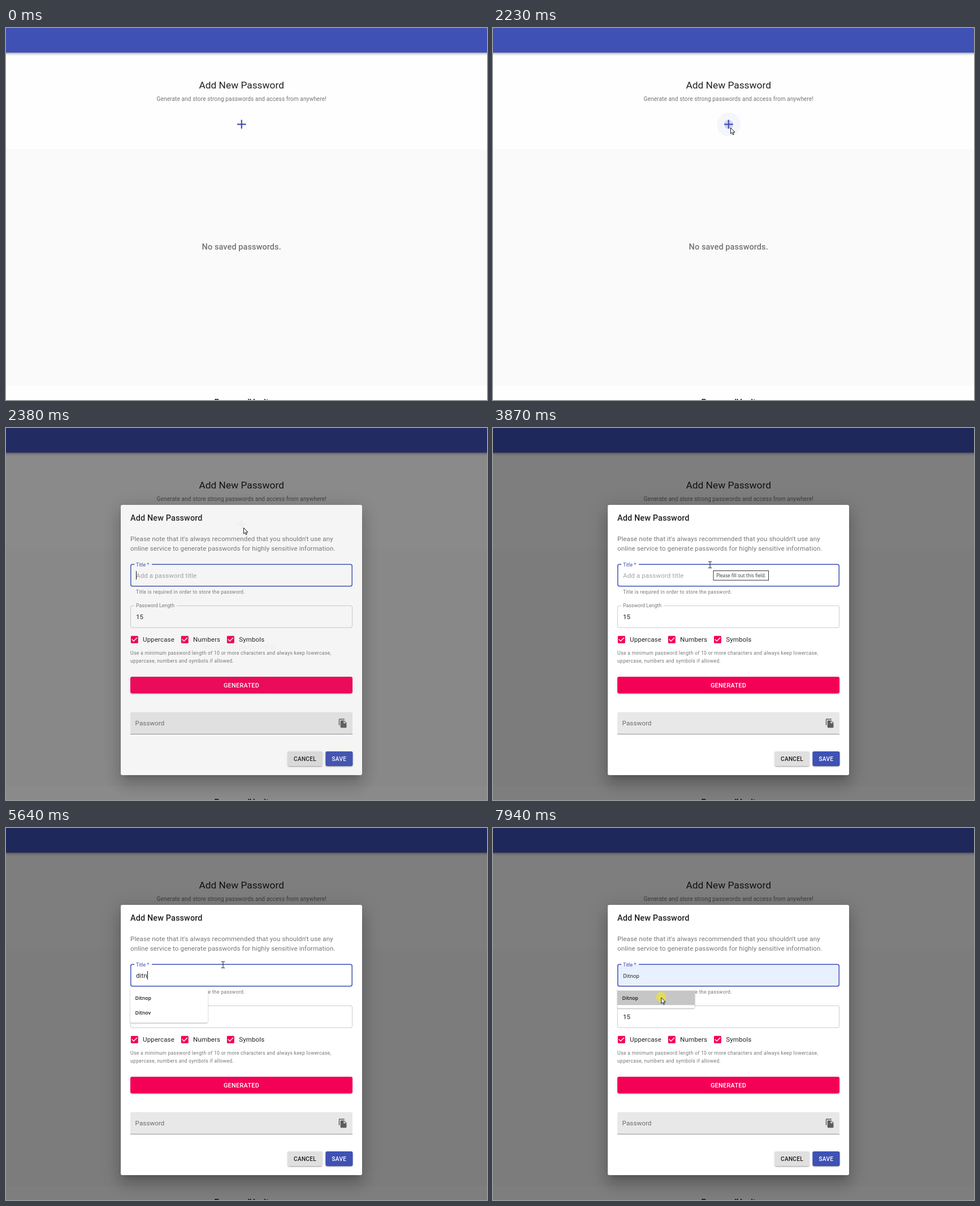
Recreate the animation shown at these times as an HTML page with a canvas. Size 851 by 658 pixels, loop 8000 ms.

```html
<!DOCTYPE html>
<html lang="en">
<head>
<meta charset="utf-8">
<title>Add New Password</title>
<style>
  html, body { margin: 0; width: 100%; height: 100%; overflow: hidden; background: #fff; }
  canvas { display: block; }
</style>
</head>
<body>
<canvas id="stage" width="851" height="658"></canvas>
<script>
const W = 851, H = 658, LOOP = 8000, K = 0.722, MID = 416.7;
const BLUE = '#3f51b5', PINK = '#f50057';
const ink = a => `rgba(0,0,0,${a})`;

// weight, size and letter spacing (em) before the page zoom K
const STYLES = {
  h5: [400, 24, 0], h6: [500, 20, 0.0075], body: [400, 16, 0.00938],
  body2: [400, 14, 0.01071], caption: [400, 12, 0.03333], label: [400, 12, 0.00938],
  button: [500, 14, 0.02857], large: [500, 15, 0.02857],
  item: [600, 12.1, 0, 'Open Sans'], preview: [400, 12.7, 0, 'Open Sans'], tip: [400, 11.35, 0, 'Open Sans']
};

function layer() {
  const c = document.createElement('canvas');
  c.width = W; c.height = H;
  return c.getContext('2d');
}

function setFont(c, style) {
  const [weight, size, spacing, family = 'Roboto'] = STYLES[style];
  c.font = `${weight} ${size * K}px "${family}", sans-serif`;
  c.letterSpacing = `${spacing * size * K}px`;
}

function text(c, str, x, y, style, color = ink(0.87), align = 'left') {
  setFont(c, style);
  c.fillStyle = color;
  c.textAlign = align;
  c.fillText(str, x, y);
}

function rect(c, x, y, w, h, color, r = 0) {
  c.fillStyle = color;
  c.beginPath();
  c.roundRect(x, y, w, h, r);
  c.fill();
}

function disc(c, x, y, r, color) {
  c.fillStyle = color;
  c.beginPath();
  c.arc(x, y, r, 0, Math.PI * 2);
  c.fill();
}

// each shadow: offset y, blur, spread, alpha
function shadow(c, x, y, w, h, list) {
  c.save();
  c.shadowOffsetX = 3000;
  for (const [dy, blur, spread, a] of list) {
    const s = spread * K;
    c.shadowColor = ink(a);
    c.shadowOffsetY = dy * K;
    c.shadowBlur = blur * K;
    rect(c, x - s - 3000, y - s, w + 2 * s, h + 2 * s, '#000', 3);
  }
  c.restore();
}

const BAR = [[2, 4, -1, 0.2], [4, 5, 0, 0.14], [1, 10, 0, 0.12]];
const RAISED = [[3, 1, -2, 0.2], [2, 2, 0, 0.14], [1, 5, 0, 0.12]];
const MODAL = [[11, 15, -7, 0.2], [24, 38, 3, 0.14], [9, 46, 8, 0.12]];

function icon(c, path, cx, cy, color, size = 24 * K) {
  c.save();
  c.translate(cx - size / 2, cy - size / 2);
  c.scale(size / 24, size / 24);
  c.fillStyle = color;
  c.fill(new Path2D(path));
  c.restore();
}

const PLUS = 'M19 13h-6v6h-2v-6H5v-2h6V5h2v6h6v2z';
const CHECK = 'M19 3H5c-1.1 0-2 .9-2 2v14c0 1.1.9 2 2 2h14c1.1 0 2-.9 2-2V5c0-1.1-.9-2-2-2zm-9 14l-5-5 1.4-1.4L10 14.2l7.6-7.6L19 8l-9 9z';
const COPY = 'M16 1H4c-1.1 0-2 .9-2 2v14h2V3h12V1zm-1 4l6 6v10c0 1.1-.9 2-2 2H8c-1.1 0-2-.9-2-2V7c0-1.1.9-2 2-2h7zm-1 7h5.5L14 6.5V12z';

// outlined box with a notch in its top edge
function outline(c, y, h, from, to, width, color) {
  c.save();
  c.beginPath();
  c.rect(0, 0, W, H);
  c.rect(from, y - 2, to - from, 4);
  c.clip('evenodd');
  c.strokeStyle = color;
  c.lineWidth = width;
  c.beginPath();
  c.roundRect(220 + width / 2, y + width / 2, 393 - width, h - width, 2.9);
  c.stroke();
  c.restore();
}

function button(c, x, y, w, h, label, style, fill, color, baseline) {
  shadow(c, x, y, w, h, RAISED);
  rect(c, x, y, w, h, fill, 2.9);
  text(c, label, x + w / 2, baseline, style, color, 'center');
}

function buildPage() {
  const c = layer();
  rect(c, 0, 0, W, H, '#fefefe');
  rect(c, 0, 214, W, 419, '#fafafa');
  shadow(c, -20, 0, W + 40, 43.5, BAR);
  rect(c, 0, 0, W, 43.5, BLUE);
  text(c, 'Add New Password', MID, 107.4, 'h5', ink(0.87), 'center');
  text(c, 'Generate and store strong passwords and access from anywhere!', MID, 128.8, 'body2', ink(0.54), 'center');
  text(c, 'No saved passwords.', MID, 392, 'h6', ink(0.54), 'center');
  text(c, 'PenosurdVault', MID, 666.8, 'h6', ink(0.87), 'center');
  return c.canvas;
}

function buildDialog() {
  const c = layer(), soft = ink(0.54);
  shadow(c, 203, 136, 427, 478, MODAL);
  rect(c, 203, 136, 427, 478, '#fff', 2.9);
  text(c, 'Add New Password', 220, 164.4, 'h6');
  text(c, "Please note that it's always recommended that you shouldn't use any", 220, 200.2, 'body', soft);
  text(c, 'online service to generate passwords for highly sensitive information.', 220, 217.2, 'body', soft);
  text(c, 'Title is required in order to store the password.', 230, 293, 'caption', soft);

  outline(c, 314, 39.5, 227, 302, 0.8, ink(0.27));
  text(c, 'Password Length', 230, 317.3, 'label', soft);
  text(c, '15', 230, 338.2, 'body');

  [['Uppercase', 227.3], ['Numbers', 316.3], ['Symbols', 397.4]].forEach(([name, x]) => {
    icon(c, CHECK, x, 374.3, PINK);
    text(c, name, x + 14.8, 378.4, 'body');
  });
  text(c, 'Use a minimum password length of 10 or more characters and always keep lowercase,', 220, 401.4, 'caption', soft);
  text(c, 'uppercase, numbers and symbols if allowed.', 220, 414.8, 'caption', soft);

  button(c, 220, 440, 393, 29.2, 'GENERATED', 'large', PINK, '#fff', 458.8);
  rect(c, 220, 502.5, 393, 39.5, ink(0.09), [2.9, 2.9, 0, 0]);
  rect(c, 220, 541.3, 393, 0.8, ink(0.5));
  text(c, 'Password', 228.6, 526.4, 'body', soft);
  icon(c, COPY, 596, 522.2, ink(0.6));
  button(c, 498, 572, 62, 26, 'CANCEL', 'button', '#e0e0e0', ink(0.87), 588.5);
  button(c, 565.3, 572, 48.2, 26, 'SAVE', 'button', BLUE, '#fff', 588.5);
  return c.canvas;
}

// pointer strokes: start, end, number of steps, then the points passed
const MOVES = [
  [70, 830, 11, [[802, 637], [600, 510], [430, 380], [331, 300], [352, 275]]],
  [910, 1390, 7, [[354, 266], [366, 235], [395, 190], [416, 167]]],
  [1620, 1910, 5, [[405, 175], [412, 193], [423, 190], [420, 176]]],
  [2470, 2850, 5, [[420, 181], [410, 205], [384, 242]]],
  [7380, 7780, 6, [[378, 247], [345, 268], [312, 290], [297.3, 299.5]]]
];

function pointerAt(t) {
  const move = MOVES.filter(m => t >= m[0]).pop();
  if (!move) return null;
  const [start, end, steps, pts] = move;
  const step = Math.min(steps - 1, Math.floor((t - start) / (end - start) * (steps - 1) + 1e-6));
  const f = step / (steps - 1) * (pts.length - 1);
  const i = Math.min(pts.length - 2, Math.floor(f)), u = f - i;
  return [0, 1].map(k => pts[i][k] + (pts[i + 1][k] - pts[i][k]) * u);
}

const KEYS = [4100, 4330, 5180, 5640, 5960, 6360];
const WORD = 'ditnop';
const ENTRIES = ['Ditnop', 'Ditnov', 'Ditmal', 'Dorvel', 'Dunsam', 'Dolmisk'];
const ROWS = [0, 6, 3, 3, 2, 2, 1];
const CARET = [[2310, 2850], [3320, 3870], [4100, 4860], [5180, 6910], [7380, 7620]];

function drawField(c, t, typed, hover) {
  const opening = t < 2380;
  if (hover) rect(c, 220, 240.5, 393, 40, '#e8f0fe', 2.9);
  outline(c, 240.5, 40, 227, opening ? 229 : 258, 1.5, BLUE);
  if (opening) {
    text(c, 'Title *', 230, 250.4, 'label', ink(0.54));
  } else {
    text(c, 'Title *', 230, 244.6, 'label', BLUE);
  }
  if (hover) text(c, ENTRIES[0], 230, 265.2, 'preview', '#111');
  else if (typed) text(c, typed, 230, 265.2, 'body');
  else text(c, 'Add a password title', 230, 265.2, 'body', ink(opening ? 0.2 : 0.37));

  if (!hover && CARET.some(([a, b]) => t >= a && t < b)) {
    setFont(c, 'body');
    rect(c, Math.round(230 + c.measureText(typed).width), 253, 1, 15, '#111');
  }
  if (t >= 3320 && t < 4100) {
    rect(c, 389.5, 252, 98.5, 17.7, '#333');
    rect(c, 390.5, 253, 96.5, 15.7, '#fff');
    text(c, 'Please fill out this field.', 395, 263.9, 'tip', '#333');
  }
}

function drawList(c, rows, hover) {
  if (!rows) return;
  const w = rows > 3 ? 164 : 137, h = rows * 25.8 + 10;
  shadow(c, 220, 283, w, h, [[1, 3, 0, 0.4]]);
  rect(c, 220, 282, w, h + 1, '#fff', [0, 0, 2, 2]);
  if (hover) rect(c, 220, 287.6, w, 25.6, '#c6c6c6');
  ENTRIES.slice(0, rows).forEach((name, i) => text(c, name, 228.5, 303.7 + i * 25.8, 'item', '#1c1c1c'));
}

const ARROW = new Path2D('M.5 .5v10.6l2.4-2.2 1.7 3.9 1.7-.8-1.7-3.7h3.3z');
const BEAM = new Path2D('M-3 -5.5h2l1 .8 1-.8h2M0 -4.7v9.4M-3 5.5h2l1-.8 1 .8h2');

function drawPointer(c, x, y, beam) {
  c.save();
  c.translate(x, y);
  c.strokeStyle = '#1a1a1a';
  c.lineWidth = 1;
  if (beam) {
    c.stroke(BEAM);
  } else {
    c.fillStyle = '#fff';
    c.fill(ARROW);
    c.stroke(ARROW);
  }
  c.restore();
}

const stage = document.getElementById('stage').getContext('2d');
const page = buildPage(), dialog = buildDialog(), modal = layer();

function draw(t) {
  const c = stage;
  c.drawImage(page, 0, 0);
  if (t >= 2230 && t < 2380) {
    const opening = t >= 2310;
    if (!opening) disc(c, 417, 170.5, 21, 'rgba(63,81,181,.045)');
    disc(c, 417, 170.5, opening ? 14 : 8, `rgba(63,81,181,${opening ? 0.3 : 0.2})`);
  }
  icon(c, PLUS, 416.8, 170.3, BLUE, 26.6);

  const pos = pointerAt(t);
  const hover = t >= 7380 && pos[1] > 288;
  const open = t < 2310 ? 0 : t < 2380 ? 0.34 : t < 2470 ? 0.92 : 1;
  if (open) {
    const count = KEYS.filter(k => t >= k).length;
    rect(c, 0, 0, W, H, ink(open / 2));
    modal.clearRect(0, 0, W, H);
    modal.drawImage(dialog, 0, 0);
    drawField(modal, t, WORD.slice(0, count), hover);
    drawList(modal, ROWS[count], hover);
    c.globalAlpha = open;
    c.drawImage(modal.canvas, 0, 0);
    c.globalAlpha = 1;
  }
  if (!pos) return;

  const [x, y] = pos;
  if ((t >= 2060 && t < 2230) || t >= 7940) disc(c, x, y - 0.7, 8.7, 'rgba(238,230,40,.7)');
  const beam = open === 1 && x > 220 && x < 613 && y > 240.5 && y < 281;
  drawPointer(c, x, y, beam);
}

const began = performance.now();
function tick() {
  draw((performance.now() - began) % LOOP);
  requestAnimationFrame(tick);
}
tick();
</script>
</body>
</html>
```
